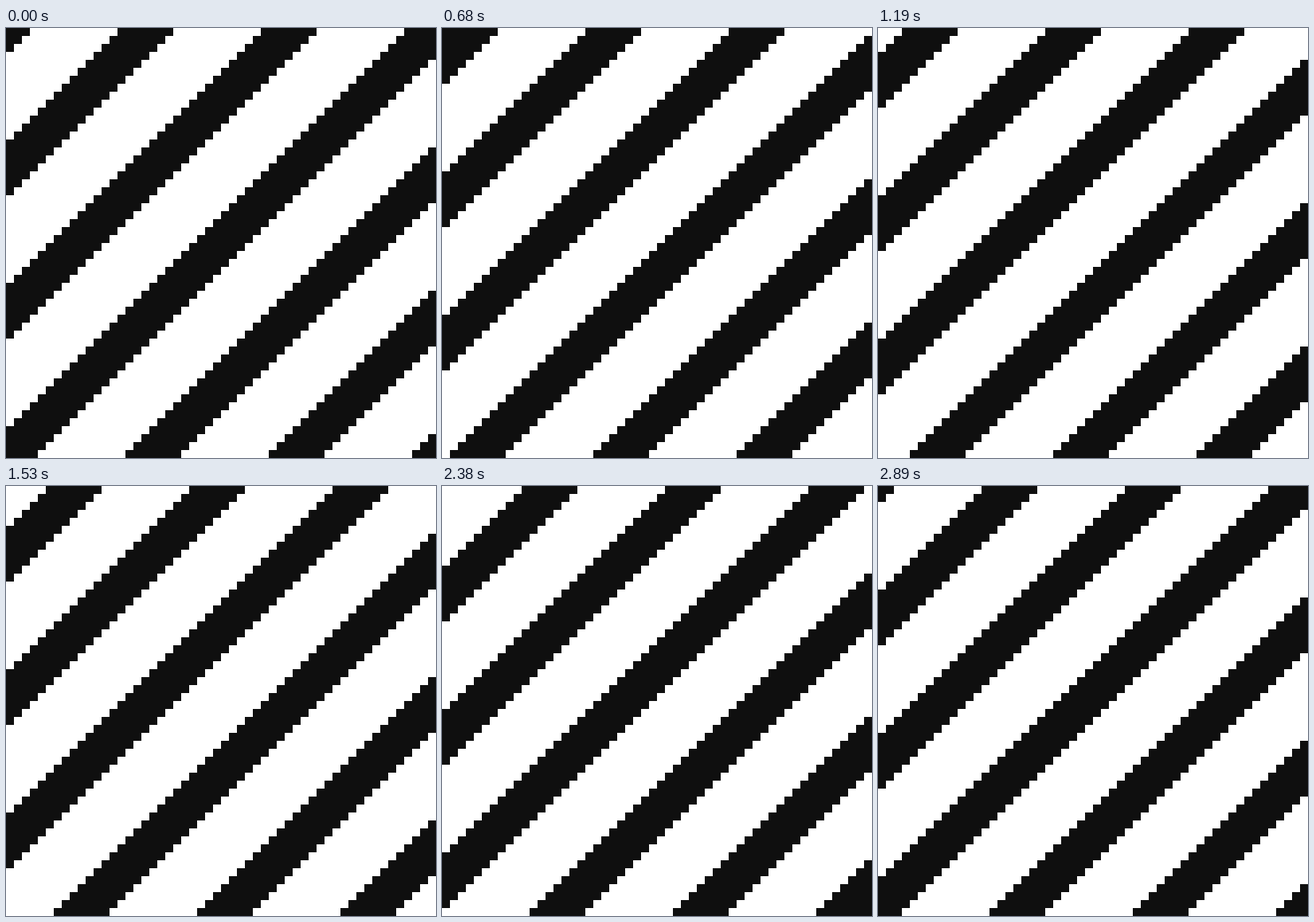
Write an HTML page without scripts that moves like this. It is 540 px wide and 540 px high and loops after 3060 ms.

```html
<!DOCTYPE html>
<html lang="en">
<head>
<meta charset="utf-8">
<title>Diagonal stripes</title>
<style>
  html, body { margin: 0; width: 100%; height: 100%; overflow: hidden; background: #fff; }
  svg { display: block; width: 100vw; height: 100vh; }
  /* One 10px cell per step, one 180px stripe period per loop */
  .stripes { animation: slide 3060ms steps(18, end) infinite; }
  @keyframes slide { to { transform: translateX(180px); } }
</style>
</head>
<body>
<svg viewBox="0 0 540 540" shape-rendering="crispEdges">
  <defs>
    <!-- Each row sits one cell lower and one cell further left -->
    <path id="row" d="M-220 5H1220" stroke="#0f0f0f" stroke-width="10" stroke-dasharray="70 110"/>
    <g id="rows3">
      <use href="#row"/>
      <use href="#row" x="-10" y="10"/>
      <use href="#row" x="-20" y="20"/>
    </g>
    <g id="rows9">
      <use href="#rows3"/>
      <use href="#rows3" x="-30" y="30"/>
      <use href="#rows3" x="-60" y="60"/>
    </g>
    <g id="rows18">
      <use href="#rows9"/>
      <use href="#rows9" x="-90" y="90"/>
    </g>
  </defs>
  <g class="stripes">
    <!-- 18 rows make a full period, so the block repeats straight down -->
    <use href="#rows18"/>
    <use href="#rows18" y="180"/>
    <use href="#rows18" y="360"/>
  </g>
</svg>
</body>
</html>
```
